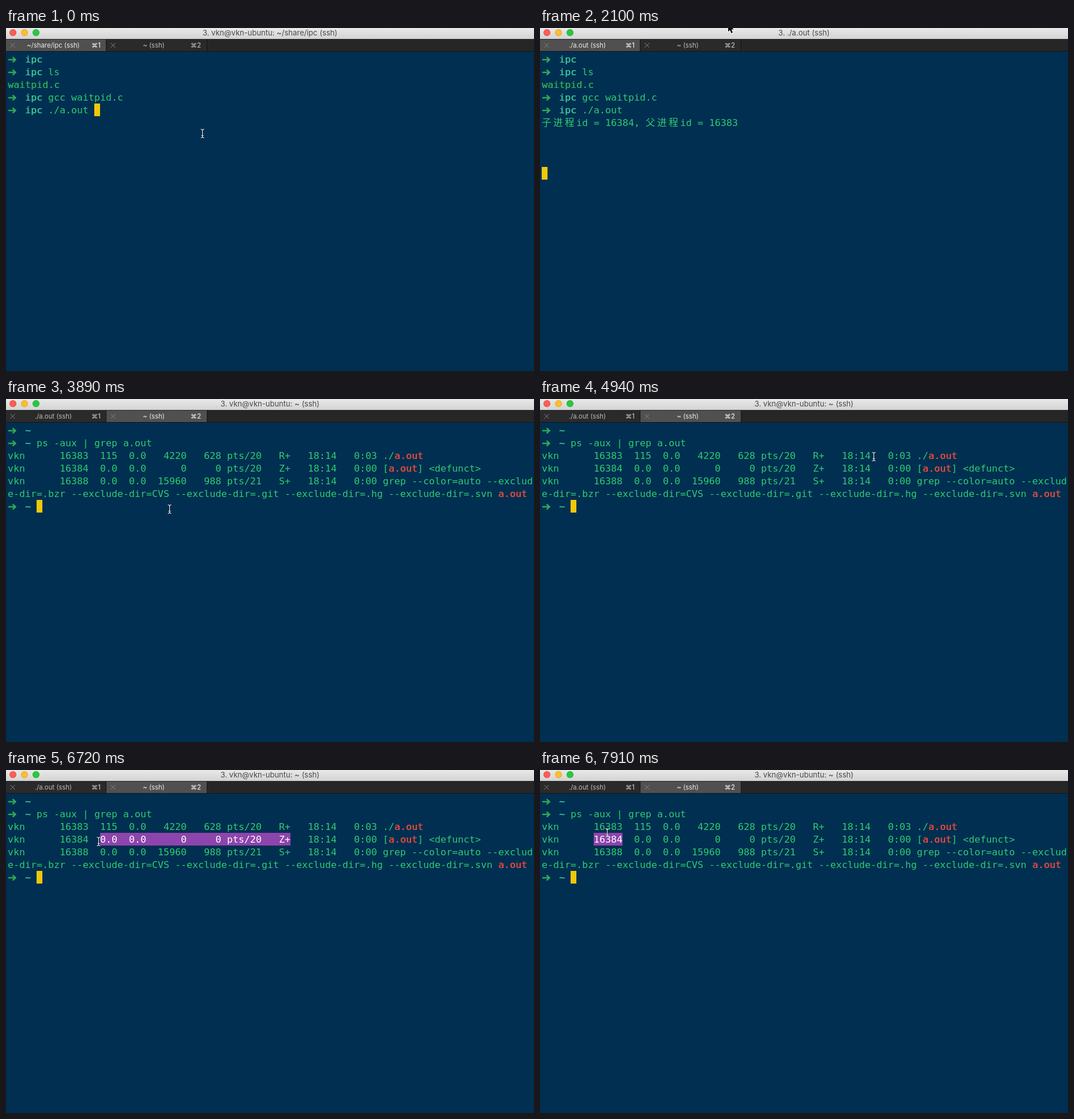
These frames come from a looping animation (915 px wide and 595 px high, 8000 ms). An HTML page with a canvas:

```html
<!DOCTYPE html>
<html lang="en">
<head>
<meta charset="utf-8">
<title>Terminal session</title>
<style>
html, body { margin: 0; width: 915px; height: 595px; overflow: hidden; background: #012f51; }
canvas { display: block; }
</style>
</head>
<body>
<canvas id="stage" width="915" height="595"></canvas>
<script>
const ctx = document.getElementById('stage').getContext('2d');
const LOOP = 8000;
const LEFT = 3, TOP = 43, CELL = 10, ROW = 22;
const MONO = '16.6px "DejaVu Sans Mono", "Noto Sans CJK SC", "Noto Sans CJK", monospace';
const UI = 'Inter, Roboto, sans-serif';
const USER = 'vkn', HOST = USER + '-ubuntu';

// text styles: colour, and whether the strokes are thickened
const STYLE = {
  text: ['#2ecc71', false],
  file: ['#30a856', true],
  dir: ['#3dc699', true],
  match: ['#e74c3c', true],
  sel: ['#ffffff', false]
};

// pointer strokes: start time, time per step, positions
const LEGS = [
  [0, 150, [[340, 183]]],
  [600, 150, [[362, 184], [388, 185], [383, 187]]],
  [1800, 150, [[376, 150], [350, 70], [326, -7.5], [305, 24], [290, 130], [285, 204], [283, 191]]],
  [4190, 148, [[240, 172], [184, 146], [262, 112], [420, 101], [545, 104], [578, 100], [520, 97], [484, 96]]],
  [5380, 146.6, [[478, 90], [474, 101], [480, 110], [477, 115], [488, 119], [494, 121]]],
  [6420, 147, [[470, 121], [320, 122], [160, 124], [104, 127], [96, 128]]],
  [7310, 150, [[108, 128], [118, 128], [118, 127]]],
  [7910, 150, [[116, 109]]]
];

function pointerAt(t) {
  const [start, step, points] = LEGS.filter(leg => leg[0] <= t).pop();
  return points[Math.min(points.length - 1, Math.floor((t - start) / step))];
}

function label(text, x, y, size, color, weight = 400, align = 'center') {
  ctx.font = `${weight} ${size}px ${UI}`;
  ctx.textAlign = align;
  ctx.fillStyle = color;
  ctx.fillText(text, x, y);
}

// writes text on the character grid; CJK glyphs take two cells
function put(row, col, text, style = 'text') {
  const [color, heavy] = STYLE[style];
  const y = TOP + ROW * row + 17;
  ctx.font = MONO;
  ctx.textAlign = 'left';
  ctx.fillStyle = color;
  for (const ch of text) {
    const x = LEFT + CELL * col;
    if (ch !== ' ') {
      ctx.fillText(ch, x, y);
      if (heavy) ctx.fillText(ch, x + 0.5, y);
    }
    col += ch > '\u2e80' ? 2 : 1;
  }
}

function prompt(row, dir, command = '') {
  const y = TOP + ROW * row + 12;
  ctx.strokeStyle = STYLE.file[0];
  ctx.lineWidth = 2.4;
  ctx.beginPath();
  ctx.moveTo(4, y);
  ctx.lineTo(16, y);
  ctx.moveTo(11.5, y - 4.5);
  ctx.lineTo(16.5, y);
  ctx.lineTo(11.5, y + 4.5);
  ctx.stroke();
  put(row, 3, dir, 'dir');
  put(row, 4 + dir.length, command);
}

function block(row, col, width, color) {
  ctx.fillStyle = color;
  ctx.fillRect(LEFT + CELL * col, TOP + ROW * row, CELL * width, ROW);
}

const caret = (row, col) => block(row, col, 1, '#f0c808');

function closeMark(x, y) {
  ctx.strokeStyle = '#858585';
  ctx.lineWidth = 1;
  ctx.beginPath();
  ctx.moveTo(x - 4, y - 4); ctx.lineTo(x + 4, y + 4);
  ctx.moveTo(x + 4, y - 4); ctx.lineTo(x - 4, y + 4);
  ctx.stroke();
}

function tab(x, width, name, key, active) {
  ctx.fillStyle = active ? '#505050' : '#2a2a2a';
  ctx.fillRect(x, 20, width, 20);
  closeMark(x + 11.5, 30);
  const color = active ? '#ececec' : '#bcbcbc';
  label(name, x + 82, 34, 11.3, color);
  label('⌘' + key, x + 164, 34, 11.3, color, 500, 'right');
}

function chrome(title, firstTab, second) {
  const bar = ctx.createLinearGradient(0, 0, 0, 19);
  bar.addColorStop(0, '#e9e9e9');
  bar.addColorStop(1, '#d3d3d3');
  ctx.fillStyle = bar;
  ctx.fillRect(0, 0, 915, 19);
  ctx.strokeStyle = 'rgba(0,0,0,0.12)';
  ctx.lineWidth = 1;
  ['#fc5d55', '#fdbd2f', '#29c83f'].forEach((color, i) => {
    ctx.fillStyle = color;
    ctx.beginPath();
    ctx.arc(12 + 20 * i, 8, 6, 0, Math.PI * 2);
    ctx.fill();
    ctx.beginPath();
    ctx.arc(12 + 20 * i, 8, 5.5, 0, Math.PI * 2);
    ctx.stroke();
  });
  label(title, 457.5, 13, 13, '#484848');

  ctx.fillStyle = '#262626';
  ctx.fillRect(0, 19, 915, 21);
  tab(0, 173, firstTab, 1, !second);
  tab(174, 174, '~ (ssh)', 2, second);
  ctx.fillStyle = '#141414';
  ctx.fillRect(173, 19, 1, 21);
  ctx.fillRect(348, 19, 1, 21);
  ctx.fillRect(0, 40, 915, 1);
}

function buildScreen(t) {
  prompt(0, 'ipc');
  prompt(1, 'ipc', 'ls');
  put(2, 0, 'waitpid.c', 'file');
  prompt(3, 'ipc', 'gcc waitpid.c');
  if (t < 150) caret(4, 15);
  prompt(4, 'ipc', './a.out');
  if (t >= 300) put(5, 0, '子进程id = 16384, 父进程id = 16383');
  if (t >= 150) {
    const returns = t < 1200 ? 0 : Math.min(3, 1 + Math.floor((t - 1200) / 150));
    caret((t < 300 ? 5 : 6) + returns, 0);
  }
}

const processes = [
  '16383  115  0.0   4220   628 pts/20   R+   18:14   0:03 ./',
  '16384  0.0  0.0      0     0 pts/20   Z+   18:14   0:00 [',
  '16388  0.0  0.0  15960   988 pts/21   S+   18:14   0:00 grep --color=auto --exclud'
];
const wrapped = 'e-dir=.bzr' + ['CVS', '.git', '.hg', '.svn'].map(d => ' --exclude-dir=' + d).join('');

// selected column range on the second process line
function selection(t, x) {
  if (t >= 6420 && t < 7310) return [Math.round((x - LEFT) / CELL), 49];
  if (t >= 7460) return [9, 14];
  return null;
}

function processScreen(t, x) {
  prompt(0, '~');
  if (t < 3140) {
    prompt(1, '~');
    caret(1, 5);
    return;
  }
  prompt(1, '~', 'ps -aux | grep a.out');
  if (t < 3890) {
    caret(1, 25);
    return;
  }
  const range = selection(t, x);
  processes.forEach((line, i) => {
    const text = USER.padEnd(9) + line;
    if (i === 1 && range) {
      const [from, to] = range;
      block(3, from, to - from, '#8e44ad');
      put(3, 0, text.slice(0, from));
      put(3, from, text.slice(from, to), 'sel');
      put(3, to, text.slice(to));
    } else {
      put(2 + i, 0, text);
    }
  });
  put(2, 67, 'a.out', 'match');
  put(3, 66, 'a.out', 'match');
  put(3, 71, '] <defunct>');
  put(5, 0, wrapped);
  put(5, 85, 'a.out', 'match');
  prompt(6, '~');
  caret(6, 5);
}

function beam(x, y) {
  const path = new Path2D();
  for (const side of [-1, 1]) {
    path.moveTo(x + side * 3, y - 7.5);
    path.quadraticCurveTo(x, y - 7.5, x, y - 5);
    path.moveTo(x + side * 3, y + 7.5);
    path.quadraticCurveTo(x, y + 7.5, x, y + 5);
  }
  path.moveTo(x, y - 5);
  path.lineTo(x, y + 5);
  path.moveTo(x - 2, y + 3.5);
  path.lineTo(x + 2, y + 3.5);
  ctx.strokeStyle = 'rgba(0,15,30,0.6)';
  ctx.lineWidth = 2.4;
  ctx.stroke(path);
  ctx.strokeStyle = '#f4f4f4';
  ctx.lineWidth = 1.1;
  ctx.stroke(path);
}

function arrow(x, y) {
  const path = new Path2D('M0 0V14L3.2 11L5.5 16.5L8 15.4L5.8 10H10Z');
  ctx.save();
  ctx.translate(x, y);
  ctx.strokeStyle = '#fff';
  ctx.lineWidth = 2;
  ctx.stroke(path);
  ctx.fillStyle = '#0a0a0a';
  ctx.fill(path);
  ctx.restore();
}

function draw(t) {
  const second = t >= 2990;
  const running = t >= 150;
  const [x, y] = pointerAt(t);
  ctx.fillStyle = '#012f51';
  ctx.fillRect(0, 0, 915, 595);
  const title = second ? `${USER}@${HOST}: ~` : running ? './a.out' : `${USER}@${HOST}: ~/share/ipc`;
  chrome(`3. ${title} (ssh)`, (running ? './a.out' : '~/share/ipc') + ' (ssh)', second);
  if (second) processScreen(t, x);
  else buildScreen(t);
  if (y < 41) arrow(x, y);
  else beam(x + 0.5, y);
}

const begin = performance.now();
function tick() {
  draw((performance.now() - begin) % LOOP);
  requestAnimationFrame(tick);
}
tick();
</script>
</body>
</html>
```
